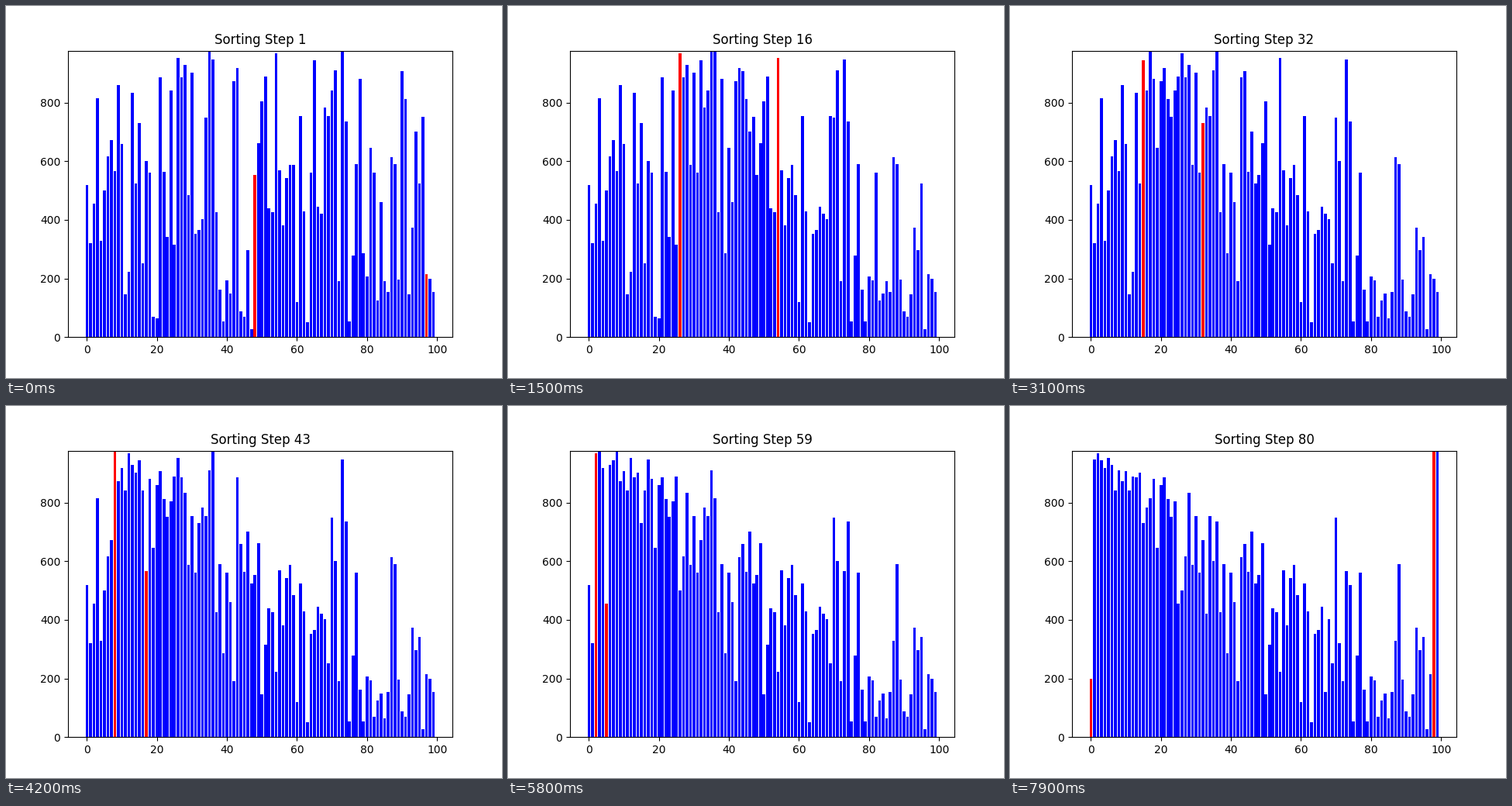
Animation, 640 px wide and 480 px high, one loop 8000 ms. Source, as a matplotlib script:

```python
import matplotlib.pyplot as plt
from matplotlib.animation import FuncAnimation

STEPS = 80

# The unsorted input; every later state follows from the heap sort.
VALUES = [
    519, 321, 456, 815, 329, 500, 617, 672, 566, 860,
    659, 146, 223, 833, 525, 731, 252, 601, 561, 69,
    64, 887, 564, 342, 842, 316, 953, 886, 929, 485,
    902, 352, 366, 403, 749, 977, 947, 427, 162, 53,
    194, 148, 874, 918, 88, 69, 297, 27, 215, 662,
    804, 889, 440, 427, 968, 570, 381, 543, 588, 587,
    120, 755, 429, 51, 561, 945, 445, 421, 784, 755,
    842, 910, 191, 976, 736, 53, 278, 590, 881, 286,
    207, 646, 561, 125, 461, 191, 154, 614, 590, 197,
    908, 812, 146, 374, 702, 525, 752, 554, 199, 154,
]


def swap(a, i, j):
    a[i], a[j] = a[j], a[i]
    return a[:], (i, j)


def sift_down(a, n, i):
    while True:
        top = i
        for child in (2 * i + 1, 2 * i + 2):
            if child < n and a[child] > a[top]:
                top = child
        if top == i:
            return
        yield swap(a, i, top)
        i = top


def heap_sort(values):
    """Yield the list and the swapped pair after every swap."""
    a = values[:]
    n = len(a)
    for i in range(n // 2 - 1, -1, -1):
        yield from sift_down(a, n, i)
    for end in range(n - 1, 0, -1):
        yield swap(a, 0, end)
        yield from sift_down(a, end, 0)


history = [state for _, state in zip(range(STEPS), heap_sort(VALUES))]

fig, ax = plt.subplots(figsize=(6.4, 4.8), dpi=100)
bars = ax.bar(range(len(VALUES)), VALUES, color="blue")
ax.set_ylim(0, max(VALUES))
title = ax.set_title("")


def draw(step):
    heights, pair = history[step]
    for i, (bar, h) in enumerate(zip(bars, heights)):
        bar.set_height(h)
        bar.set_facecolor("red" if i in pair else "blue")
    title.set_text(f"Sorting Step {step + 1}")
    return [*bars, title]


anim = FuncAnimation(fig, draw, frames=STEPS, interval=100,
                     repeat=True, repeat_delay=0)
plt.show()
```
